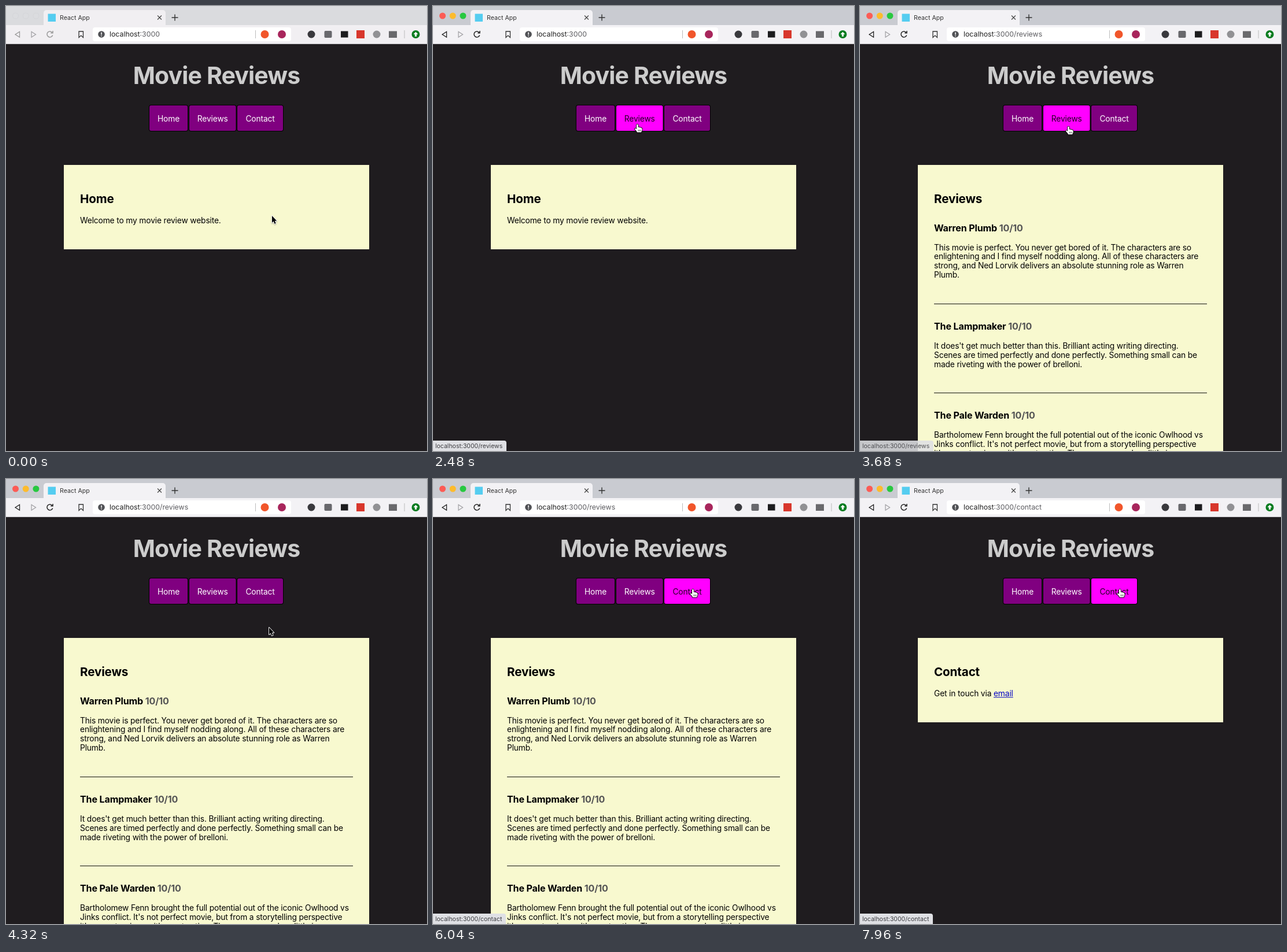
Animation of 728x770 px, one loop 8 s. Source, as an HTML page with a canvas:

```html
<!DOCTYPE html>
<html lang="en">
<head>
<meta charset="utf-8">
<title>Movie Reviews</title>
<style>
html, body { margin: 0; width: 100%; height: 100%; overflow: hidden; background: #1f1c1f; }
canvas { display: block; width: 728px; height: 770px; }
</style>
</head>
<body>
<canvas id="stage"></canvas>
<script>
const W = 728, H = 770, LOOP = 8000;
const canvas = document.getElementById('stage');
const ctx = canvas.getContext('2d');
const dpr = window.devicePixelRatio || 1;
canvas.width = W * dpr;
canvas.height = H * dpr;

const ACTIVATE = 1320, OPEN_REVIEWS = 2800, OPEN_CONTACT = 7320;
const CREAM = '#f8f9cf';

// Cursor tip: time, x, y
const path = [
  [0, 460, 363], [500, 460, 363], [1200, 353.5, 205], [3600, 353.5, 205],
  [4100, 455, 257], [4420, 455, 257], [4900, 449.5, 191], [LOOP, 449.5, 191]
];

// Link bubble: start, end, label, width
const bubbles = [
  [1400, 3820, 'localhost:3000/reviews', 127],
  [4760, LOOP + 500, 'localhost:3000/contact', 126]
];

const buttons = [
  { label: 'Home', x: 248, w: 66 },
  { label: 'Reviews', x: 317, w: 80.5 },
  { label: 'Contact', x: 400, w: 79 }
];

const reviews = [
  { y: 389.5, title: 'Warren Plumb', lines: [
    'This movie is perfect. You never get bored of it. The characters are so',
    'enlightening and I find myself nodding along. All of these characters are',
    'strong, and Ned Lorvik delivers an absolute stunning role as Warren',
    'Plumb.'] },
  { y: 560, title: 'The Lampmaker', lines: [
    "It does't get much better than this. Brilliant acting writing directing.",
    'Scenes are timed perfectly and done perfectly. Something small can be',
    'made riveting with the power of brelloni.'] },
  { y: 714, title: 'The Pale Warden', lines: [
    'Bartholomew Fenn brought the full potential out of the iconic Owlhood vs',
    "Jinks conflict. It's not perfect movie, but from a storytelling perspective",
    "it's a masterpiece with great acting. There are some slow, little in"] }
];

const arrow = new Path2D('M0 0V12L2.7 9.5L4.6 14L6.6 13.1L4.7 8.8H8.2Z');
const hand = new Path2D('M-1.5 1.2C-1.5-.6 1.3-.6 1.3 1.2V5Q2.6 4 3.7 5.4Q5 4.6 6 6' +
  'Q8 5.6 8 7.6V10L6.5 13.5H-.5L-1.5 11.6L-4.6 8Q-4.8 6.3-3 6.8L-1.5 8.2Z');

const clamp = v => Math.max(0, Math.min(1, v));
const ease = u => u * u * (3 - 2 * u);

function text(str, x, y, size, color, opt = {}) {
  ctx.font = `${opt.weight || 400} ${size}px Inter, sans-serif`;
  ctx.letterSpacing = `${(opt.track || 0) * size}px`;
  ctx.textAlign = opt.align || 'left';
  ctx.fillStyle = color;
  ctx.fillText(str, x, y);
  return x + ctx.measureText(str).width;
}

const body = (str, x, y, color = '#000', align = 'left') =>
  text(str, x, y, 13.8, color, { track: -0.011, align });

function rect(x, y, w, h, color) {
  ctx.fillStyle = color;
  ctx.fillRect(x, y, w, h);
}

function round(x, y, w, h, r, color) {
  ctx.beginPath();
  ctx.roundRect(x, y, w, h, r);
  ctx.fillStyle = color;
  ctx.fill();
}

function disc(x, y, r, color) {
  ctx.beginPath();
  ctx.arc(x, y, r, 0, Math.PI * 2);
  ctx.fillStyle = color;
  ctx.fill();
}

function stroke(d, color, width = 1.3) {
  ctx.strokeStyle = color;
  ctx.lineWidth = width;
  ctx.stroke(new Path2D(d));
}

function cursorAt(t) {
  let i = 0;
  while (i < path.length - 2 && t >= path[i + 1][0]) i++;
  const [t0, x0, y0] = path[i], [t1, x1, y1] = path[i + 1];
  const u = ease(clamp((t - t0) / (t1 - t0)));
  return { x: x0 + (x1 - x0) * u, y: y0 + (y1 - y0) * u };
}

function drawLights(active) {
  ['#fc5b55', '#fdbb2d', '#28c840'].forEach((color, i) => {
    const x = 16.5 + i * 17.7;
    disc(x, 17, 5.5, active ? color : '#d4d5d8');
    if (!active) disc(x, 17, 4.6, '#dbdcdf');
  });
}

function drawChrome(active, url) {
  const bar = active ? '#f3f2f5' : '#f1eff2';
  const ink = active ? '#222' : '#999';
  rect(0, 0, W, 33, active ? '#c9cbd1' : '#dadbde');
  rect(0, 33, W, 33, bar);
  rect(0, 65, W, 1, '#c4c3c7');
  round(65, 7, 211, 28, [5, 5, 0, 0], bar);
  drawLights(active);

  rect(72.5, 13.5, 13.5, 13.5, '#55cdf0');
  text('React App', 93, 24, 10.6, '#333');
  stroke('M262 16.5l7 7m0-7l-7 7', '#444', 1.2);
  stroke('M292 14.5v11m-5.5-5.5h11', '#333', 1.4);

  stroke('M23.5 44.5v9.5l-7.5-4.75z', ink);
  stroke('M44 44.5v9.5l7.5-4.75z', '#a3a2a6');
  stroke('M80 46A5 5 0 1 0 80.7 50.5', ink, 1.5);
  stroke('M81 43v3.7h-3.7', ink, 1.5);
  stroke('M126 44h7.5v10.5l-3.75-3.4l-3.75 3.4z', '#333');

  round(150, 37, 343, 24, 4, '#fff');
  disc(165, 49, 5.8, '#505155');
  rect(164.3, 45.5, 1.5, 4.3, '#fff');
  rect(164.3, 51, 1.5, 1.5, '#fff');
  const end = text('localhost', 179, 53.3, 12.3, '#222');
  text(url.slice(9), end, 53.3, 12.3, '#5c5c60');

  rect(431, 42, 1, 14, '#bbb');
  disc(447.5, 49, 7, '#f1562b');
  disc(477, 49, 7, '#a8265c');
  disc(528, 49, 6.5, '#39393d');
  round(550.5, 43, 13, 12, 2, '#68686c');
  rect(579, 43.5, 12.5, 11, '#1c1c1e');
  rect(606, 42, 14, 14, '#d8372c');
  disc(641, 49, 6.5, '#919194');
  rect(662, 43.5, 14, 11.5, '#69696c');
  rect(688.5, 42, 1, 14, '#bbb');
  disc(708.5, 49, 7, '#087c20');
  ctx.fillStyle = '#fff';
  ctx.fill(new Path2D('M708.5 44.7l4 4.3h-2.4v3.8h-3.2V49h-2.4z'));
}

function drawNav(hovered) {
  text('Movie Reviews', 364, 135, 41, '#ccc', { weight: 700, track: -0.021, align: 'center' });
  for (const b of buttons) {
    const hot = b === hovered;
    round(b.x - 1, 171, b.w + 2, 46, 4, '#000');
    round(b.x, 172, b.w, 44, 3, hot ? '#ff00ff' : '#800080');
    body(b.label, b.x + b.w / 2, 199.5, hot ? '#240024' : '#fff', 'center');
  }
}

function drawPage(name) {
  const long = name === 'Reviews';
  rect(100, 275, 528, long ? H - 275 : 146, CREAM);
  text(name, 128, 341.3, 20.7, '#000', { weight: 700, track: -0.009 });
  if (name === 'Home') body('Welcome to my movie review website.', 128, 376);
  if (name === 'Contact') {
    const x = body('Get in touch via ', 128, 376);
    const end = body('email', x, 376, '#0000c4');
    rect(x, 377.3, end - x, 1, '#0000c4');
  }
  if (long) reviews.forEach(drawReview);
}

function drawReview({ y, title, lines }, i) {
  const style = { weight: 700, track: -0.01 };
  const x = text(title + ' ', 128, y, 16.1, '#000', style);
  text('10/10', x, y, 16.1, '#555', style);
  lines.forEach((line, n) => body(line, 128, y + 33.2 + n * 15.75));
  if (i < 2) rect(128, i ? 669 : 515, 472, 1, '#111');
}

function drawBubble(t) {
  for (const [start, end, label, w] of bubbles) {
    const alpha = Math.min(clamp((t - start) / 120), clamp((end - t) / 160));
    if (!alpha) continue;
    ctx.globalAlpha = alpha;
    round(0, 752, w, 18, [0, 4, 0, 0], '#dfe0e4');
    text(label, 4, 765, 10.5, '#3c3c40');
    ctx.globalAlpha = 1;
  }
}

function drawCursor({ x, y }, pointing) {
  ctx.save();
  ctx.translate(x, y);
  ctx.lineJoin = 'round';
  ctx.shadowColor = 'rgba(0,0,0,.35)';
  ctx.shadowBlur = 2 * dpr;
  ctx.shadowOffsetY = dpr;
  const shape = pointing ? hand : arrow;
  ctx.lineWidth = pointing ? 1.5 : 1.8;
  ctx.strokeStyle = pointing ? '#000' : '#fff';
  ctx.stroke(shape);
  ctx.shadowColor = 'transparent';
  ctx.fillStyle = pointing ? '#fff' : '#000';
  ctx.fill(shape);
  if (pointing) stroke('M1.6 9v2.6M3.6 9v2.6M5.6 9v2.6', '#000', 0.7);
  ctx.restore();
}

function draw(t) {
  const active = t >= ACTIVATE;
  const page = t < OPEN_REVIEWS ? 'Home' : t < OPEN_CONTACT ? 'Reviews' : 'Contact';
  const url = 'localhost:3000' + (page === 'Home' ? '' : '/' + page.toLowerCase());
  const pos = cursorAt(t);
  const hovered = active && buttons.find(b =>
    pos.x >= b.x && pos.x < b.x + b.w && pos.y >= 172 && pos.y < 216);

  ctx.setTransform(dpr, 0, 0, dpr, 0, 0);
  rect(0, 0, W, H, '#1f1c1f');
  drawChrome(active, url);
  drawNav(hovered);
  drawPage(page);
  drawBubble(t);
  drawCursor(pos, !!hovered);
}

const begin = performance.now();
function tick() {
  draw((performance.now() - begin) % LOOP);
  requestAnimationFrame(tick);
}
tick();
</script>
</body>
</html>
```
